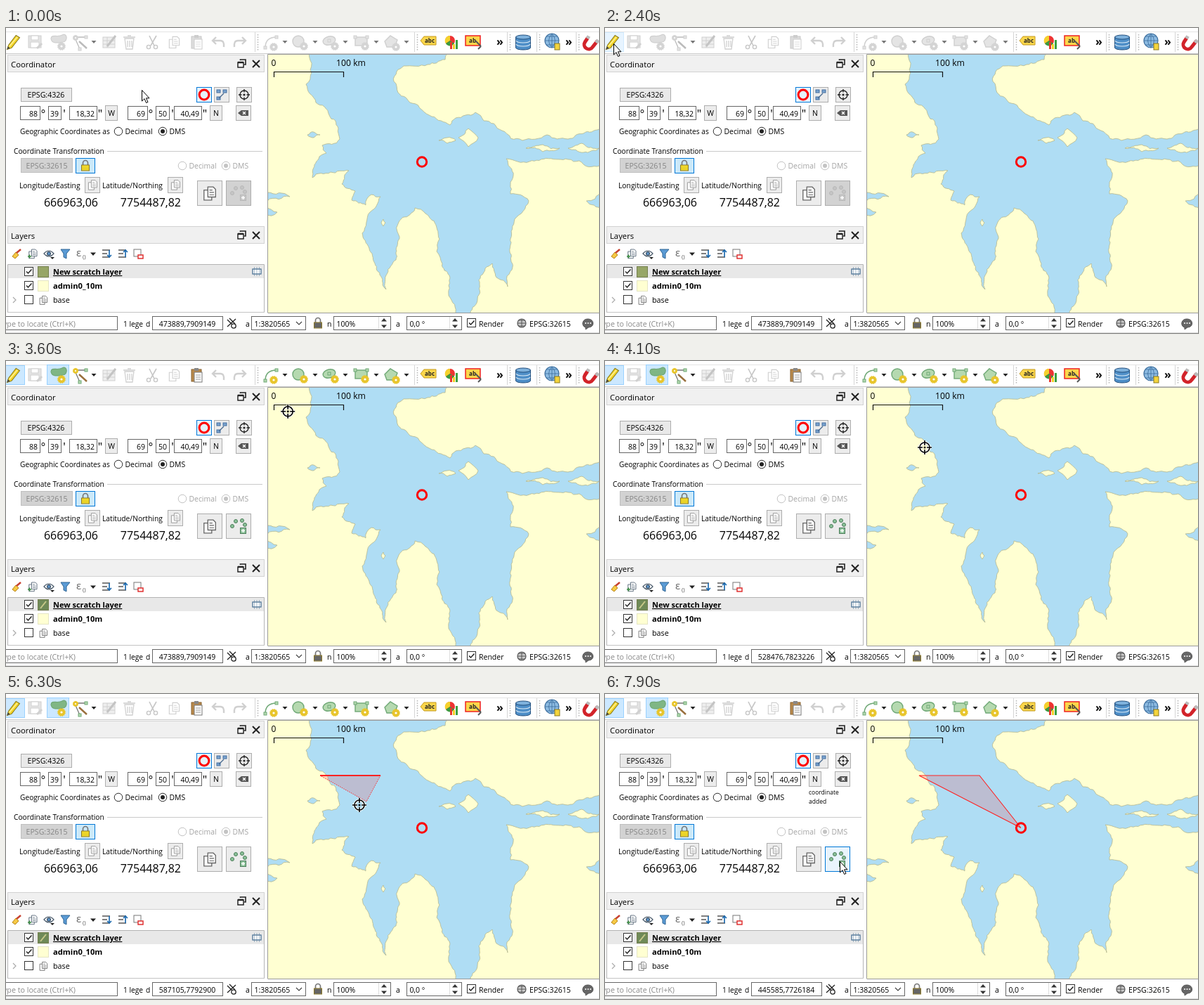
Write an HTML page that moves like this. It is 844 px wide and 434 px high and loops after 8 s.

```html
<!DOCTYPE html>
<html lang="en">
<head>
<meta charset="utf-8">
<title>Adding a polygon vertex by coordinate</title>
<style>
html,body{margin:0;width:100%;height:100%;overflow:hidden;background:#fff}
svg{display:block;width:844px;height:434px;font-family:"Open Sans","Noto Sans",sans-serif}
</style>
</head>
<body>
<svg id="stage" viewBox="0 0 844 434" xmlns="http://www.w3.org/2000/svg"></svg>
<script>
const stage = document.getElementById('stage');
const rect = (x, y, w, h, f, s = 'none', a = '') => `<rect x="${x}" y="${y}" width="${w}" height="${h}" fill="${f}" stroke="${s}" ${a}/>`;
const box = (x, y, w, h, f = '#fff', s = '#666') => rect(x + .5, y + .5, w - 1, h - 1, f, s);
const path = (d, s, w = 1, f = 'none', a = '') => `<path d="${d}" stroke="${s}" stroke-width="${w}" fill="${f}" ${a}/>`;
const fill = (d, f) => `<path d="${d}" fill="${f}"/>`;
const circ = (x, y, r, f, s = 'none', w = 1) => `<circle cx="${x}" cy="${y}" r="${r}" fill="${f}" stroke="${s}" stroke-width="${w}"/>`;
const text = (x, y, s, size = 10.5, c = '#000', a = '') => `<text x="${x}" y="${y}" font-size="${size}" fill="${c}" ${a}>${s}</text>`;
const at = (x, y, s, k = 1) => `<g transform="translate(${x} ${y}) scale(${k})">${s}</g>`;
const group = (id, s) => `<g id="${id}">${s}</g>`;
const END = 'text-anchor="end"', MID = 'text-anchor="middle"', BOLD = ' font-weight="700"';

// ---- map: key points joined by a rough, seeded shoreline ----
let seed = 77;
const rnd = () => (seed = seed * 16807 % 2147483647) / 2147483647;

function split(x0, y0, x1, y1, out) {
  const dx = x1 - x0, dy = y1 - y0, len = Math.hypot(dx, dy);
  if (len < 5 || len > 120) { out.push(x1.toFixed(1) + ' ' + y1.toFixed(1)); return; }
  const k = (rnd() - .5) * .32, mx = (x0 + x1) / 2 - dy * k, my = (y0 + y1) / 2 + dx * k;
  split(x0, y0, mx, my, out);
  split(mx, my, x1, y1, out);
}
function shore(points, color) {
  const p = points.split(' ').map(s => s.split(',').map(Number)), out = [];
  p.forEach((a, i) => split(...a, ...p[(i + 1) % p.length], out));
  return path('M' + out.join('L') + 'Z', '#b4b78d', .8, color);
}
const LAND = '#ffffd2', SEA = '#afddf4';
const lens = (x, y, rx, ry, c) => shore(`${x - rx},${y} ${x},${y - ry} ${x + rx},${y} ${x},${y + ry}`, c);
const west = '360,20 431,30 433,46 427,80 441,106 460,124 473,143 475,158 450,167 456,178 436,213 462,205 488,203 478,222 497,232 492,245 512,252 520,237 533,240 518,262 507,292 525,335 541,372 555,330 557,290 582,256 597,264 617,300 613,318 631,352 641,408 641,430 360,430';
const east = '659,430 659,408 674,365 682,342 692,335 714,368 721,340 718,300 724,272 744,246 718,236 722,210 712,186 745,190 800,187 860,192 860,430';
const north = '635,28 625,45 600,52 566,54 556,62 552,76 558,92 578,107 606,126 632,138 640,128 668,120 680,132 706,146 735,160 770,152 800,158 822,150 860,126 860,28';
const map = `<clipPath id="mapClip"><rect x="373" y="38" width="471" height="367"/></clipPath><g clip-path="url(#mapClip)">`
  + rect(373, 38, 471, 367, SEA)
  + [west, east, north].map(p => shore(p, LAND)).join('')
  + lens(658, 156, 14, 13, LAND) + lens(764, 171, 24, 5, LAND) + lens(822, 171, 22, 6, LAND) + lens(537, 277, 3, 5, LAND) + lens(628, 160, 12, 4, LAND)
  + lens(372, 240, 32, 6, SEA) + lens(368, 262, 18, 5, SEA) + lens(438, 152, 9, 4, SEA) + lens(848, 246, 22, 12, SEA)
  + group('sketch', '')
  + circ(592, 190.5, 6.7, 'none', '#f00', 3) + '</g>'
  + text(381, 54, '0', 12, '#000', MID) + text(491, 54, '100 km', 12.2, '#000', MID)
  + path('M381.5 70V62.5H480.5V70', '#111', 1.2)
  + path('M372.5 405V37.5H844M372.5 405.5H844', '#9a9a9a');

// ---- icons ----
const pages = (x, y, k = 1, c = '#999') => at(x, y, path('M-7 -4H0L3 -1V9H-7Z', c, 1.2, '#fff')
  + path('M-2 -8H5L8 -5V5H-2Z', c, 1.2, '#fff') + path('M0 -4H4M0 -1H6M0 2H6', c), k);
const arrow = (x, c) => fill(`M${x - 3.5} 18H${x + 3.5}L${x} 22Z`, c);
const burst = (x, y, c, k = 1) => at(x, y, [0, 30, 60].map(a => `<rect x="-4.4" y="-4.4" width="8.8" height="8.8" fill="${c}" transform="rotate(${a})"/>`).join('') + circ(0, 0, 1.6, '#fff'), k);
const pencil = (x, y, k = 1) => at(x, y, path('M-8 10L-6 4 4-9 9-6 -2 8Z', '#8a7a1a', 1, '#f3d529')
  + path('M-5 6L6-7', '#fff3a0', 1.4) + fill('M-8 10L-7 6-4 8Z', '#444'), k);
const sep = x => path(`M${x}.5 6V34`, '#d5d5d5') + path(`M${x + 4}.5 9V32`, '#b5b5b5', 1.5, 'none', 'stroke-dasharray="1.5 2"');
const more = x => text(x, 25, '»', 16, '#111', MID + BOLD);

// Tools that wake up when editing is on
function tools(on) {
  const g = on ? '#6fa876' : '#cfcfcf', f = on ? '#b5d9b0' : '#e4e4e4', y = on ? '#e8c52c' : '#d4d4d4';
  const node = (x, v) => rect(x - 2, v - 2, 4, 4, f, g);
  return path('M64 15C65 8 73 14 80 10S89 19 81 20 65 23 64 15Z', g, 1.2, on ? '#7fb685' : '#dedede') + burst(79, 26, y)
    + path('M97 13L114 13M98 14L105 30', on ? '#777' : '#bbb', 1.3) + node(114, 13) + node(105, 30) + burst(99, 14, y, .7)
    + path('M104 19L115 29', on ? '#996f3c' : '#bbb', 2.4)
    + path('M369 28Q369 13 385 13', g, 1.6) + node(369, 28) + node(385, 13) + burst(381, 27, y)
    + circ(416, 19, 8, f, g, 1.4) + burst(424, 26, y)
    + `<ellipse cx="460" cy="18" rx="9" ry="6" fill="${f}" stroke="${g}" stroke-width="1.4" transform="rotate(-15 460 18)"/>` + node(460, 18) + burst(468, 26, y)
    + rect(497, 13, 17, 12, f, g, 'stroke-width="1.4"') + node(497, 13) + node(514, 13) + burst(511, 26, y)
    + path('M539 19L547 11 557 17 553 27H542Z', g, 1.4, f) + burst(555, 27, y)
    + [125, 397, 440, 483, 527, 570].map(x => arrow(x, on ? '#222' : '#777')).join('')
    + rect(264, 12, 14, 17, on ? '#b98a4c' : '#ddd', on ? '#87612d' : '#c8c8c8') + rect(268, 10, 6, 4, on ? '#888' : '#ccc')
    + rect(268, 16, 11, 14, '#fff', on ? '#777' : '#ccc') + path('M270 20H277M270 23H277M270 26H277', on ? '#999' : '#ddd');
}
const D = '#d0d0d0';
const turn = path('M-3-5L-8 0-3 5M-7 0H3Q9 0 8 9', D, 2.4);
const bar = group('pencilBg', rect(-.5, 6.5, 27, 27, '#cce8ff', '#99d1ff')) + group('polyBg', rect(58.5, 5.5, 31, 28, '#cce8ff', '#99d1ff'))
  + pencil(10, 20, 1.05)
  + rect(32, 11, 18, 17, '#e4e4e4', D) + rect(36, 11, 10, 6, '#fff', D) + rect(35, 20, 12, 8, '#fff', D) + path('M44 29L51 22', D, 3)
  + group('off', tools(false)) + group('on', tools(true))
  + rect(138, 13, 17, 15, '#eee', D) + path('M138 18H155M138 23H155M144 13V28', D) + path('M144 26L156 11', '#c4c4c4', 3)
  + path('M169 15H182L180 30H171ZM167 13H184M173 11H178M173 18V27M176 18V27M179 18V27', D, 1.3)
  + path('M204 11L211 25M214 11L206 25', '#c6c6c6', 1.6) + circ(203, 27, 2.6, 'none', '#c6c6c6', 1.4) + circ(213, 27, 2.6, 'none', '#c6c6c6', 1.4)
  + pages(239, 20, .95, D) + at(302, 18, turn) + `<g transform="translate(333 18) scale(-1 1)">${turn}</g>`
  + [354, 581, 713, 755, 811].map(sep).join('')
  + path('M590 18L595 12H612V24H595Z', '#c49a1c', 1, '#fbd64b') + text(603, 21, 'abc', 8, '#222', MID + BOLD)
  + circ(632, 18, 7, '#e33') + fill('M632 18V11A7 7 0 0 0 626 22Z', '#f5d22c') + fill('M632 18L638 22A7 7 0 0 1 626 22Z', '#3a9b3f')
  + rect(632, 20, 3, 10, '#e6372e') + rect(636, 23, 3, 7, '#f3cf25') + rect(640, 17, 3, 13, '#3c9f41')
  + rect(654, 11, 21, 14, '#fbd64b', '#e22', 'stroke-width="1.5"') + text(664, 21, 'ab', 8, '#222', MID + BOLD) + path('M668 18l8 8m-4 4l4-4', '#555', 2)
  + more(703) + more(801)
  + path('M725.5 13V28C726 32 746 32 746.5 28V13Z', '#234f7d', 1, '#4f8fc8') + '<ellipse cx="736" cy="13" rx="10.5" ry="3" fill="#7fb2dd" stroke="#234f7d"/>'
  + path('M726 18C728 22 744 22 746 18M726 23C728 27 744 27 746 23', '#dcecf8', 1.2)
  + circ(777, 18, 10, '#8dbbe2', '#3c6e9e', 1.2) + path('M767 18H787M769 12H785M769 24H785M777 8V28M777 8Q768 18 777 28M777 8Q786 18 777 28', '#3c6e9e', .8)
  + rect(781, 22, 7, 9, '#f4d43c', '#8b7a22')
  + path('M828 14L824 20A6.5 6.5 0 0 0 835 27L842 18', '#d2232a', 5) + path('M829.5 11.5L827.5 15M840 21L843 17', '#bbb', 5);

// ---- docks ----
const title = (y, s) => rect(2.5, y + .5, 365, 24, '#f0f0f0', '#d2d2d2') + text(7, y + 18, s, 11.3)
  + at(0, y, path('M333.5 8V7H341V14H339', '#222', 1.6) + rect(330, 11, 8, 7, '#fff', '#222', 'stroke-width="1.5"') + path('M330 11H338', '#222', 2.5)
  + path('M351 8L361 18M361 8L351 18', '#222', 2));
const button = (x, y, w, h, s = '', f = '#ececec', b = '#adadad') => box(x, y, w, h, f, b) + s;
const radio = (x, y, s, on, dim) => circ(x, y, 5.8, '#fff', dim ? '#c4c4c4' : '#333') + (on ? circ(x, y, 3, dim ? '#c4c4c4' : '#222') : '') + text(x + 9.5, y + 4, s, 10.4, dim ? '#a3a3a3' : '#000');
const field = (x, w, s, unit) => box(x, 111, w, 20) + text(x + w - 4, 125.5, s, 10.5, '#000', END) + text(x + w + 4, 128, unit, 16, '#000', MID);
const lock = (x, y, c) => at(x, y, path('M-3.5 -1V-4A3.5 3.5 0 0 1 3.5 -4V-1', '#777', 1.7) + rect(-5.5, -1, 11, 8, c, '#8a7726') + path('M-5 2H5M-5 4.5H5', '#0002'));
const target = at(339, 95, circ(0, 0, 6, 'none', '#222', 1.3) + circ(0, 0, 1.6, '#222') + path('M-8 0H-3.5M3.5 0H8M0-8V-3.5M0 3.5V8', '#222', 1.3));
const dots = (c, p) => circ(322, 235, 2.5, c, p) + circ(327, 228, 2.5, c, p) + circ(336, 227, 2.5, c, p) + circ(340, 233, 2.5, c, p)
  + rect(333.5, 237.5, 8, 8, c, p) + path('M337.5 239V244M335 241.5H340', '#fff', 1.5);

const coordinator = title(38, 'Coordinator')
  + button(21, 85, 73, 20, text(57, 98.5, 'EPSG:4326', 10.6, '#000', MID), '#e9e9e9')
  + button(271, 84, 22, 22, circ(282, 95, 6.9, 'none', '#f00', 3), '#e5f2fc', '#0078d7')
  + button(296, 84, 22, 22, rect(300, 88, 5, 4, '#7ba4d0', '#456f9f') + rect(309, 88, 5, 4, '#7ba4d0', '#456f9f') + rect(300, 98, 5, 4, '#7ba4d0', '#456f9f') + path('M303 100L310 93', '#47698f', 1.2))
  + button(328, 84, 22, 22, target)
  + field(20, 29, '88', '°') + field(60, 19, '39', "'") + field(90, 40, '18,32', '"') + field(173, 29, '69', '°') + field(213, 20, '50', "'") + field(239, 40, '40,49', '"')
  + button(141, 110, 18, 22, text(150, 125, 'W', 10.5, '#000', MID)) + button(290, 110, 18, 22, text(299, 125, 'N', 10.5, '#000', MID))
  + button(327, 110, 22, 22, fill('M330 121L335 117H345V125H335Z', '#555') + path('M337 119l4 4m0-4l-4 4', '#fff', 1.4))
  + text(20, 151, 'Geographic Coordinates as', 10.2) + radio(160, 147, 'Decimal') + radio(223, 147, 'DMS', true)
  + text(11, 179, 'Coordinate Transformation', 10.2) + path('M144 175.5H365', '#c9c9c9')
  + button(21, 185, 74, 21, text(58, 199.5, 'EPSG:32615', 10.6, '#858585', MID), '#d2d2d2', '#bfbfbf')
  + button(99, 185, 28, 22, lock(113, 196, '#f8e02c'), '#cce9f9', '#0078d7')
  + radio(251, 196, 'Decimal', false, true) + radio(313, 196, 'DMS', true, true)
  + text(19, 228, 'Longitude/Easting', 10.3) + text(137, 228, 'Latitude/Northing', 10.3)
  + button(112, 212, 22, 23, pages(123, 223, .8)) + button(230, 212, 22, 23, pages(241, 223, .8))
  + text(131, 253.5, '666963,06', 16, '#000', END) + text(249, 253.5, '7754487,82', 16, '#000', END)
  + button(272, 217, 36, 36, pages(289.5, 235, 1.1, '#666'))
  + `<rect id="addBox" x="313.5" y="217.5" width="35" height="35"/>` + group('dotsOff', dots('#c6c6c6', '#b8b8b8')) + group('dotsOn', dots('#8cc29a', '#4c7d5a'))
  + group('added', text(290, 143, 'coordinate', 8.5) + text(290, 155.5, 'added', 8.5));

const check = (x, y, on) => rect(x + .5, y + .5, 12, 12, '#fff', '#333') + (on ? path(`M${x + 3} ${y + 6.5}l2.5 2.5 5-5.5`, '#222', 1.5) : '');
const tree = (x, d) => at(x, 321, path('M-4-5H7M-4 0H3M-4 5H7', '#555', 1.4) + path(`M6-5V5M3 ${2 * d}L6 ${5 * d} 9 ${2 * d}`, '#1e6bb0', 1.7));
const layers = title(282, 'Layers')
  + path('M9 325L14 319 18 323 13 328Z', '#b78313', 1, '#f6c945') + path('M15 320L21 315', '#c7402f', 2.5)
  + pages(38, 321, .75, '#567') + path('M31 325h5m-2.5-2.5v5', '#3a8b3f', 1.5)
  + path('M54 321Q61 313 68 321Q61 329 54 321Z', '#456', 1.2, '#fff') + circ(61, 321, 2.6, '#5b8fc2', '#345') + fill('M63 326h6l-3 3z', '#222')
  + path('M78 315H91L86 321V328L82 326V321Z', '#2e6593', 1, '#5b9bd5')
  + text(100, 325, 'ε', 15, '#666') + text(109, 328, '()', 8, '#555') + fill('M120 319.5h8l-4 4.5z', '#222')
  + tree(141, 1) + tree(164, -1)
  + rect(182, 315, 10, 10, '#fff', '#777') + rect(188, 323, 7, 5, '#fff', '#e03030', 'stroke-width="1.5"')
  + rect(3, 337, 364, 19, '#e8e8e8') + path('M2.5 405V336.5H367.5V405', '#b4b4b4')
  + check(26, 340, true) + check(26, 360, true) + check(26, 380, false)
  + rect(45.5, 339.5, 15, 15, '#97a667', '#75804f') + group('editMark', rect(46, 340, 14, 14, '#6f8a58') + path('M49 352L57 342', '#c9c98a', 2)) + rect(45.5, 359.5, 15, 15, LAND, '#e5e5c5')
  + text(67, 351, 'New scratch layer', 11, '#000', BOLD + ' text-decoration="underline"') + text(67, 371, 'admin0_10m', 11.2, '#000', BOLD) + text(67, 391, 'base', 10.8)
  + pages(53, 387, .7, '#666') + path('M10 383l4 4-4 4', '#aaa', 1.2)
  + rect(351, 343, 12, 7, '#fff', '#4d7396', 'stroke-width="1.3"') + path('M353 346.5H361', '#4d7396', 13, 'none', 'stroke-dasharray="1 2.5" opacity=".5"')
  + path('M2.5 404.5H368', '#c4c4c4');

// ---- status bar ----
const combo = (x, w, s) => box(x, 410, w, 20) + text(x + 4.5, 424.5, s);
const spin = x => path(`M${x - 8}.5 411V429`, '#ddd') + fill(`M${x - 4} 417.5h8l-4-4.5z`, '#333') + fill(`M${x - 4} 422.5h8l-4 4.5z`, '#333');
const status = rect(0, 406, 844, 28, '#fff') + box(-2, 410, 161, 20)
  + text(99, 424.5, 'Type to locate (Ctrl+K)', 10.7, '#8a8a8a', END)
  + text(167, 424.5, '1 lege', 10.2) + text(199, 424.5, 'd', 10.2)
  + box(208, 410, 101, 20) + `<text id="coords" x="258" y="424.5" font-size="10.5" text-anchor="middle"></text>`
  + at(321, 420, path('M-6 -5L2 3M-3 -7L5 1M-6 5L6 -6', '#222', 1.3) + circ(3, 4, 3.2, '#fff', '#222', 1.3))
  + text(341, 424.5, 'a') + combo(349, 78, '1:3820565') + path('M413 418l4 4 4-4', '#444', 1.2)
  + lock(444, 420, '#6b6b6b') + text(457, 424.5, 'n') + combo(466, 82, '100%') + spin(538)
  + text(555, 424.5, 'a') + combo(570, 79, '0,0 °') + spin(639)
  + check(656, 413, true) + text(673, 424.5, 'Render')
  + circ(734, 420, 6, '#ccc', '#555', 1.2) + path('M728 420H740M730 416H738M730 424H738M734 414V426', '#555') + text(745, 424.5, 'EPSG:32615', 10.6)
  + path('M828 414C838 414 838 426 829 426L825 429V426C819 425 819 414 828 414Z', '#555', 1, '#666') + [825, 828.5, 832].map(x => circ(x, 420, 1, '#fff')).join('')
  + path('M0 433.5H844', '#ddd');

const pointer = path('M.5 .5V16L4 12.6 6.6 18.5 9 17.4 6.5 11.8H11Z', '#000', 1, '#fff');
const aim = (c, w) => circ(0, 0, 7, 'none', c, w) + path('M-10 0H-3M3 0H10M0-10V-3M0 3V10', c, w);
stage.innerHTML = rect(0, 0, 844, 434, '#fff') + path('M0 5.5H844', '#e3e3e3') + path('M0 36.5H844', '#c8c8c8') + map + bar + coordinator + layers + status
  + group('pointer', pointer) + group('aim', aim('#fff', 3.3) + aim('#000', 1.6) + circ(0, 0, 1.5, '#000'));

// ---- motion: begin, end, x, y and how far the way sags ----
const moves = [
  [1200, 1900, 8, 14, 46], [2000, 2100, 12, 22], [2500, 3050, 79, 18], [3200, 3750, 522, 92], [3750, 4050, 455, 123],
  [4200, 4400, 447, 116], [4500, 4950, 535, 116], [5500, 5700, 533, 116], [6100, 6200, 528, 145.5],
  [6200, 6300, 503, 158], [6300, 7000, 335, 237], [7000, 7100, 334, 238]
];
function pos(t) {
  let x = 193, y = 88;
  for (const [from, to, nx, ny, sag = 0] of moves) {
    if (t <= from) break;
    const k = Math.min(1, (t - from) / (to - from));
    x += (nx - x) * k;
    y += (ny - y) * k + 4 * sag * k * (1 - k);
  }
  return [x, y];
}
const $ = id => document.getElementById(id);
const show = (id, on) => $(id).setAttribute('display', on ? 'inline' : 'none');

function sketch(t, [x, y]) {
  const A = '447 116', B = '533 116', P = `${x} ${y}`, red = '#f22', tint = 'rgba(227,92,105,.25)';
  const dotted = 'stroke-dasharray="1.5 1.5"';
  if (t < 4500) return '';
  if (t < 6000) return path(`M${A}L${P}`, red, 1, 'none', dotted);
  if (t < 7500) return fill(`M${A}L${B}L${P}Z`, tint) + path(`M${B}L${P}L${A}`, red, 1, 'none', dotted) + path(`M${A}H533`, red, 2);
  return path(`M${A}H533L592 190.5Z`, red, 1.1, tint);
}
function draw(ms) {
  const t = Math.floor(ms / 100) * 100, p = pos(t), over = t > 3200 && p[0] > 373;
  // The application trails the cursor slightly and keeps the last place on the map
  let q = pos(t - 40);
  if (q[0] < 373) q = t < 5000 ? [400.999, 37.999] : [372.999, 219];
  const e = Math.round(528476 + (q[0] - 455) * 1010.85), n = Math.round(7823225.9 - (q[1] - 123) * 1010.85);
  $('coords').textContent = e + ',' + n;
  $('sketch').innerHTML = sketch(t, q);
  const edit = t >= 2500, ready = t >= 3200, hot = t >= 6900, press = t === 7500;
  show('on', edit); show('off', !edit); show('editMark', edit);
  show('pencilBg', t >= 1900); $('pencilBg').setAttribute('opacity', edit ? 1 : .45);
  show('polyBg', t >= 3000);
  show('dotsOn', ready); show('dotsOff', !ready); show('added', t >= 7500);
  $('addBox').setAttribute('fill', press ? '#cce4f7' : hot ? '#e9f4fc' : ready ? '#ececec' : '#d2d2d2');
  $('addBox').setAttribute('stroke', press ? '#005499' : hot ? '#0078d7' : '#adadad');
  show('pointer', !over); show('aim', over);
  $(over ? 'aim' : 'pointer').setAttribute('transform', `translate(${p[0].toFixed(1)} ${p[1].toFixed(1)})`);
}
const start = performance.now();
function tick() {
  draw((performance.now() - start) % 8000);
  requestAnimationFrame(tick);
}
tick();
</script>
</body>
</html>
```
